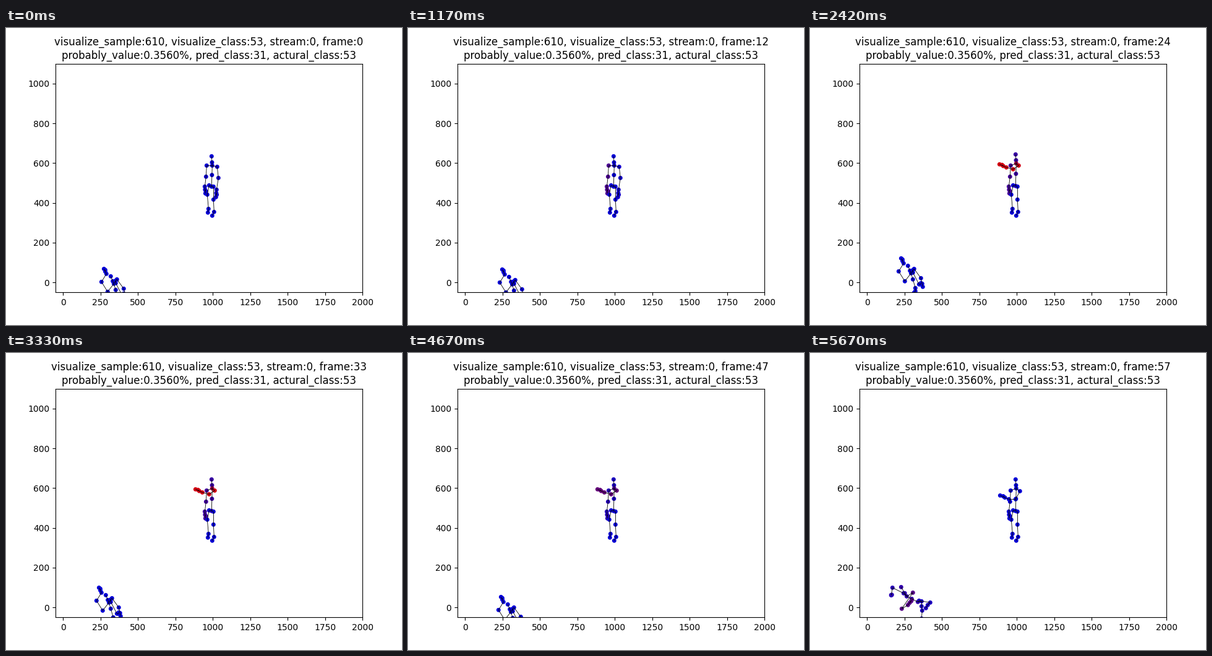
Animation of 640 by 480 pixels, one loop 5760 ms. Source, as a matplotlib script:

```python
import numpy as np
import matplotlib.pyplot as plt
from matplotlib.animation import FuncAnimation
from matplotlib.collections import LineCollection

LOOP, STEP, LEAD = 5760, 30, 24
TICK = 1000 / 12
COUNT = 58
SIZES = [5, 6, 6, 4, 4]  # spine, two arms, two legs
KEYS = np.array([0, 12, 24, 33, 38, 47, 57])

# Spine: head, neck, chest, waist, pelvis. Arm: shoulder, elbow, wrist, hand,
# thumb, tip. Leg: hip, knee, ankle, foot.
BONES = [(0, 1), (1, 2), (2, 3), (3, 4)]
for arm in (5, 11):
    BONES += [(2, arm)] + [(arm + i, arm + i + 1) for i in range(4)]
    BONES.append((arm + 3, arm + 5))
for leg in (17, 21):
    BONES += [(4, leg)] + [(leg + i, leg + i + 1) for i in range(3)]
BONES = np.array(BONES)


def smooth(n, start, end):
    u = np.clip((n - start) / (end - start), 0, 1)
    return u * u * (3 - 2 * u)


def spine(*points):
    head, chest, pelvis = np.array(points, float)
    neck, waist = head + 0.66 * (chest - head), chest + 0.45 * (pelvis - chest)
    return np.array([head, neck, chest, waist, pelvis])


def arm(*points):
    shoulder, elbow, wrist, tip = np.array(points, float)
    reach = tip - wrist
    return np.array([shoulder, elbow, wrist, wrist + 0.45 * reach,
                     wrist + 0.72 * reach + (1, -0.5), tip])


def leg(*points):
    return np.array(points, float)


# All poses are in stage pixels.
TORSO = spine((332, 207), (333, 222), (332, 256))
HANGING = arm((324, 222), (323, 240), (321, 256), (322, 267))
LEGS = [leg((328, 254), (325, 269), (327, 292), (326, 298)),
        leg((335, 256), (335, 277), (336, 297), (333, 303))]
ARM_DOWN = arm((341, 224), (343, 242), (340, 261), (339, 273))
ARM_UP = arm((337, 222), (328, 228), (317, 225), (306, 220))
ARM_BENT = arm((339, 223), (332, 236), (321, 236), (307, 230))

CROUCH = np.concatenate([
    spine((160, 388), (165, 400), (168, 395)),
    arm((155, 413), (145, 397), (153, 384), (149, 376)),
    arm((168, 410), (172, 424), (172, 429), (168, 434)),
    leg((170, 393), (181, 408), (183, 417), (184, 422)),
    leg((168, 399), (178, 418), (180, 418), (181, 416))])
SPRAWL = np.concatenate([
    spine((147, 378), (156, 393), (174, 402)),
    arm((151, 388), (133, 379), (131, 391), (131, 391)),
    arm((166, 387), (148, 413), (158, 407), (164, 399)),
    leg((176, 400), (194, 403), (190, 407), (187, 412)),
    leg((180, 401), (180, 409), (181, 416), (180, 429))])
DRIFT_X = [9, 3, -2, 1, 0, 1, 0]
DRIFT_Y = [13, 14, -4, 3, -3, 18, 0]

rng = np.random.default_rng(53)


def sway(n, size):
    """Jitter of body, limbs and joints that settles near the key poses."""
    limbs = np.repeat(rng.normal(0, 0.6, (5, 2)), SIZES, axis=0)
    noise = rng.normal(0, 0.5, 2) + limbs + rng.normal(0, 0.3, (25, 2))
    return size * min(abs(KEYS - n).min() / 2, 1) * noise


def stander(n):
    lift, fall = smooth(n, 12, 20), smooth(n, 47, 57)
    torso = TORSO.copy()
    torso[:, 1] -= lift * np.array([3, 3.5, 3.5, 2, 1])
    raised = ARM_DOWN + lift * (ARM_UP - ARM_DOWN)
    moving = raised + fall * (ARM_BENT - raised)
    return np.concatenate([torso, HANGING, moving, *LEGS]) + sway(n, 1.5)


def crawler(n):
    drift = [np.interp(n, KEYS, DRIFT_X), np.interp(n, KEYS, DRIFT_Y)]
    spread = smooth(n, 47, 57)
    return CROUCH + spread * (SPRAWL - CROUCH) + drift + sway(n, 9)


def heat(n):
    """Attention of every joint, 0 is blue and 1 is red."""
    focus = 0.08 + 0.84 * smooth(n, 12, 22) - 0.9 * smooth(n, 36, 57)
    focus = max(focus, 0.02)
    resting = np.interp(n, [0, 12, 38, 57], [0.05, 0.33, 0.27, 0.04])
    standing = np.repeat([0.27 * focus, resting, focus, 0.03, 0.03], SIZES)
    standing[2] = 0.75 * focus
    spread = smooth(n, 47, 57)
    crawling = 0.02 + spread * np.repeat([0.2, 0.16, 0.36, 0.1, 0.1], SIZES)
    return np.concatenate([standing, crawling])


def to_data(p):
    return np.column_stack([(p[:, 0] + 0.3 - 80) * 2050 / 496 - 50,
                            (426.9 - p[:, 1]) * 1150 / 369.6 - 50])


scenes = [(to_data(stander(n)), to_data(crawler(n))) for n in range(COUNT)]

fig, ax = plt.subplots(figsize=(6.4, 4.8), dpi=100)
ax.set_xlim(-50, 2000)
ax.set_ylim(-50, 1100)
title = ax.set_title("\n")
dots = ax.scatter(np.zeros(50), np.zeros(50), s=12, linewidths=1.5, zorder=1)
lines = LineCollection([], colors="black", linewidths=0.6, zorder=2)
ax.add_collection(lines)


def draw(step):
    tick = int((step * STEP + LEAD) / TICK)
    n = tick - (tick + 3) // 6  # every fifth picture is held twice as long
    v = heat(n)
    dots.set_offsets(np.concatenate(scenes[n]))
    dots.set_color(np.column_stack([0.9 * v, 0 * v, 0.86 * (1 - v)]))
    lines.set_segments(np.concatenate([p[BONES] for p in scenes[n]]))
    title.set_text(
        f"visualize_sample:610, visualize_class:53, stream:0, frame:{n}\n"
        "probably_value:0.3560%, pred_class:31, actural_class:53")
    return dots, lines, title


anim = FuncAnimation(fig, draw, frames=LOOP // STEP, interval=STEP,
                     repeat=True, repeat_delay=0)
plt.show()
```
